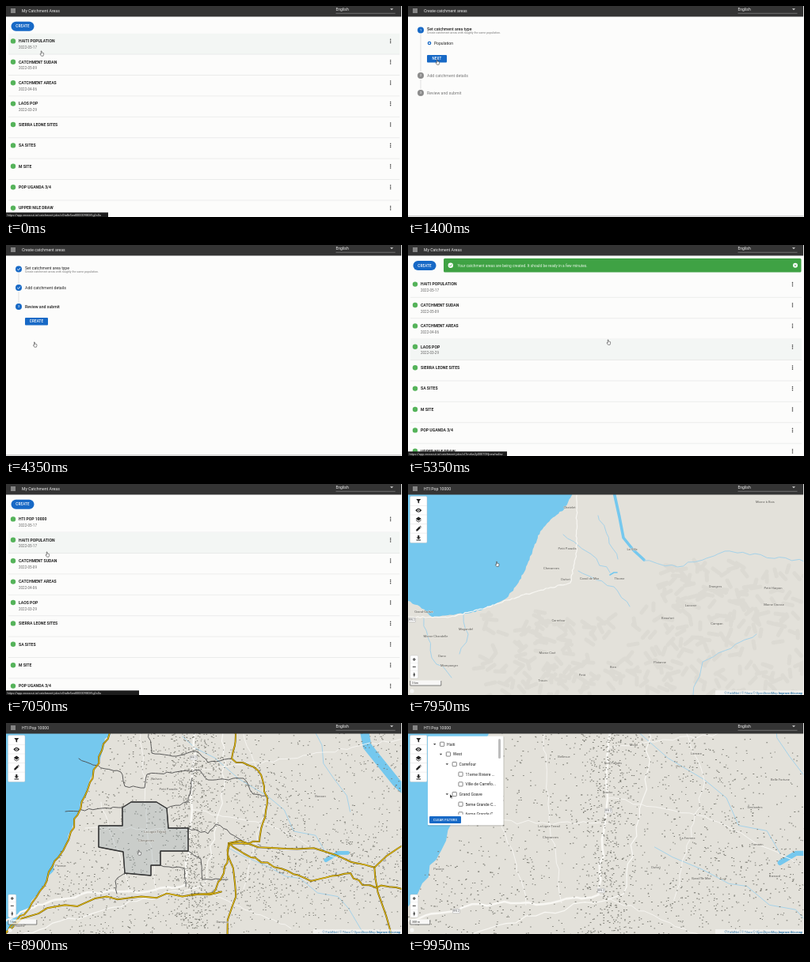
An HTML page that plays this animation: 500 by 267 pixels, repeating every 10000 ms.

```html
<!DOCTYPE html>
<html lang="en">
<head>
<meta charset="utf-8">
<title>Catchment areas</title>
<style>
html, body { margin: 0; width: 100%; height: 100%; overflow: hidden; background: #fcfcfb; }
svg { display: block; font-family: Roboto, "Open Sans", sans-serif; }
#stage { width: 100vw; height: 100vh; }
#map path { fill: none; vector-effect: non-scaling-stroke; stroke-linejoin: round; stroke-linecap: round; }
#map .fill { fill: #8fa0a6; fill-opacity: .3; }
#map .scaled { vector-effect: none; }
</style>
</head>
<body>
<svg id="stage" viewBox="0 0 500 267" preserveAspectRatio="none">
  <g id="map"></g>
  <g id="ui"></g>
</svg>
<script>
const LOOP = 10000, BLUE = '#1769c6', GREEN = '#55b35a', INK = '#222';
const map = document.getElementById('map'), ui = document.getElementById('ui');

// Drawing helpers; text is centred vertically on y
const text = (x, y, s, size = 5, fill = INK, attr = '') =>
  `<text x="${x}" y="${y + size * .36}" font-size="${size}" fill="${fill}" ${attr}>${s}</text>`;
const rect = (x, y, w, h, fill, attr = '') =>
  `<rect x="${x}" y="${y}" width="${w}" height="${h}" fill="${fill}" ${attr}/>`;
const circle = (x, y, r, fill) => `<circle cx="${x}" cy="${y}" r="${r}" fill="${fill}"/>`;
const line = (d, stroke, w = .6, attr = '') =>
  `<path d="${d}" fill="none" stroke="${stroke}" stroke-width="${w}" ${attr}/>`;
const shape = (d, fill) => `<path d="${d}" fill="${fill}"/>`;
const BOLD = 'font-weight="700"', MEDIUM = 'font-weight="500"', MIDDLE = 'text-anchor="middle"';
const button = (x, y, w, h, label, size = 4.5) =>
  rect(x, y, w, h, BLUE, `rx="${h > 10 ? h / 2 : 1}"`) +
  text(x + w / 2, y + h / 2, label, size, '#fff', `${MEDIUM} ${MIDDLE} letter-spacing=".18"`);

const clamp = v => Math.max(0, Math.min(1, v));
const ease = v => { v = clamp(v); return v * v * (3 - 2 * v); };
function track(keys, t) {
  let i = keys.findIndex(k => k[0] > t);
  if (i < 0) return keys[keys.length - 1].slice(1);
  if (!i) return keys[0].slice(1);
  const a = keys[i - 1], b = keys[i], p = ease((t - a[0]) / (b[0] - a[0]));
  return a.slice(1).map((v, j) => v + (b[j + 1] - v) * p);
}
function seeded(seed) {
  return () => (seed = (seed * 16807) % 2147483647) / 2147483647;
}

const pointer = [
  [0, 44, 57], [150, 43, 55], [500, 20, 26], [750, 20, 26], [1050, 30, 70], [1400, 36, 68],
  [1550, 36, 68], [1800, 62, 80], [2400, 62, 80], [2700, 62, 104], [2850, 62, 104],
  [3200, 35, 178], [3850, 35, 178], [4150, 35, 126], [4300, 35, 126], [4550, 38, 98],
  [4800, 38, 98], [5250, 252, 120], [5700, 252, 120], [6450, 489, 26], [6700, 489, 26],
  [7000, 51, 86], [7100, 51, 86], [7350, 40, 48], [7650, 40, 48], [8200, 165, 136],
  [8700, 165, 136], [8850, 167, 161], [9050, 167, 161], [9350, 14, 22], [9450, 14, 22],
  [9850, 53, 90]
];

function cursor(x, y, arrow) {
  const d = arrow
    ? 'M0 0V6.2L1.5 4.9 2.5 7.1 3.5 6.6 2.5 4.5H4.5Z'
    : 'M.3 0Q1-.6 1.3.2V2.6Q2 2 2.3 2.8 3 2.3 3.3 3 4.2 2.7 4.2 3.6V5.2L3.6 7.3H.6L-1.2 4.6Q-1.1 3.7.3 4.6Z';
  return `<path d="${d}" transform="translate(${x} ${y}) scale(.85)" fill="${arrow ? '#111' : '#fff'}"
    stroke="${arrow ? '#fff' : '#222'}" stroke-width=".6"/>`;
}

function header(title) {
  return rect(0, 0, 499.3, 13.5, '#343434') +
    [4, 6, 8].map(y => rect(6, y - .4, 6, .8, '#fff')).join('') +
    text(20, 6, title, 5.15, '#eee') + text(416.5, 4, 'English', 5, '#f4f4f4') +
    line('M416.5 9.3H491.5', '#aaa', .5) + shape('M485 3.2H489L487 5.3Z', '#ddd');
}

// Catchment list
const areas = ['HAITI POPULATION', 'CATCHMENT SUDAN', 'CATCHMENT AREAS', 'LAOS POP', 'SIERRA LEONE SITES',
  'SA SITES', 'M SITE', 'POP UGANDA 3/4', 'UPPER NILE DRAW'];
const dates = ['2022-05-17', '2022-05-09', '2022-04-06', '2022-03-29'];
const STEP = 26.4;

function list(t, x, y) {
  const banner = t > 4800 && t < 6700, added = t >= 6000;
  const names = added ? ['HTI POP 10000', ...areas] : areas;
  const days = added ? [dates[0], ...dates] : dates;
  const top = banner ? 39.9 : 34.7, hover = Math.floor((y - top) / STEP);
  let out = rect(0, 0, 500, 267, '#fcfcfb');
  names.forEach((name, i) => {
    const row = top + i * STEP, mid = row + 9.7;
    if (i === hover) out += rect(3, row, 494, STEP, '#f3f6f4');
    out += line(`M3 ${row + STEP}H497`, '#dfe1df', .6) + circle(9, mid, 3.2, GREEN) +
      text(16, mid, name, 5.1, INK, BOLD) + (days[i] ? text(16, mid + 8, days[i], 4.55, '#666') : '') +
      [-2.1, 0, 2.1].map(d => circle(485.5, mid + d, .75, '#333')).join('');
  });
  out += button(6.5, banner ? 20 : 19.7, 29, 12, 'CREATE');
  if (banner) out += rect(45, 17, 451.5, 17.5, '#3fa244', 'rx="1.5"') + circle(53.8, 25.8, 3.2, '#fff') +
    line('M52.2 25.8L53.4 27 55.5 24.6', '#3fa244', .8) +
    text(62.5, 25.8, 'Your catchment areas are being created. It should be ready in a few minutes.', 4.85, '#e9f6e9') +
    circle(489, 25.8, 3, '#fff') + line('M487.8 24.6L490.2 27M490.2 24.6L487.8 27', '#3fa244', .7);
  if (hover >= 0) {
    const id = hover === 3 ? 'cl7mr6w2y000709ljnewha4nv' : 'c0ta8e5wd000009l83f5g2s0u';
    out += rect(0, 261.3, t > 6700 ? 168 : banner ? 125 : 129, 5.7, '#1c1c1c') +
      text(1.5, 264.2, 'https://app.crosscut.io/catchment-jobs/' + id, 3.8, '#eee');
  }
  return out + header('My Catchment Areas');
}

// Creation form
const countries = ['Benin', 'Burundi', 'Djibouti', 'Dominican Republic', 'Equatorial Guinea', 'Eritrea', 'Eswatini',
  'Ethiopia', 'Gabon', 'Ghana', 'Guinea', 'Haiti', 'Honduras', 'Kenya', 'Lesotho'];

function step(n, y, label, active) {
  const done = n < active;
  return circle(16, y, 4, n <= active ? BLUE : '#8c8c8c') +
    (done ? line(`M14.2 ${y}L15.6 ${y + 1.4} 18 ${y - 1.4}`, '#fff', .9) : text(16, y, n, 4, '#fff', MIDDLE)) +
    text(24, n === 1 ? y - 1.8 : y, label, 5.2, n <= active ? INK : '#777', n === active ? MEDIUM : '');
}

function dropdown(t, y) {
  const scroll = ease((t - 3450) / 350) * 7, hover = Math.floor((y - 102.8) / 15.4);
  let items = '';
  countries.forEach((name, i) => items += text(5.3, 10.6 + (i - scroll) * 15.4, name, 5.05));
  return rect(23.5, 102, 464, 99, '#000', 'opacity=".09" rx="2"') + rect(24, 101, 463, 98, '#000', 'opacity=".14" rx="1"') +
    rect(24, 100, 463, 98, '#fff', 'rx="1"') +
    (hover >= 0 && hover < 6 ? rect(24, 102.8 + hover * 15.4 + .6, 459, 15.4, '#f2f5f3') : '') +
    `<svg x="24" y="100" width="459" height="98">${items}</svg>` + rect(482.5, 100, 4.5, 98, '#f5f5f5') +
    rect(483.2, 102 + scroll * 5, 2.8, 28, '#bdbdbd', 'rx="1.4"');
}

function form(t, y) {
  const active = t < 1550 ? 1 : t < 4300 ? 2 : 3;
  const ys = [[30.5, 88, 110], [30.5, 54, 151], [30.5, 54, 78]][active - 1];
  let out = rect(0, 0, 500, 267, '#fcfcfb') +
    line(`M16 ${ys[0] + 5}V${ys[1] - 5}M16 ${ys[1] + 5}V${ys[2] - 5}`, '#c4c4c4', .5) +
    step(1, ys[0], 'Set catchment area type', active) +
    text(24, 33.6, 'Create catchment areas with roughly the same population.', 3.6, '#777') +
    step(2, ys[1], 'Add catchment details', active) + step(3, ys[2], 'Review and submit', active);
  if (active === 1) out += circle(27, 47, 2.3, BLUE) + circle(27, 47, 1, '#fff') + text(33, 47, 'Population') +
    button(24, 62, 25, 9.5, 'NEXT');
  if (active === 2) {
    const typed = 'HTI Pop 10000'.slice(0, t < 2400 ? Math.round(clamp((t - 2020) / 220) * 7)
      : 7 + Math.round(clamp((t - 2400) / 200) * 6));
    const open = t > 2850 && t < 3950;
    out += text(24, 69, 'What do you want to call this set of catchment areas?', 3.65, '#777') +
      text(24, 75.6, typed) + line('M24 80.4H487', t < 2700 ? BLUE : '#888', .5) +
      text(24, 99, 'Select the country you want to target.', 3.6, open ? BLUE : '#777') +
      (t > 3950 ? text(24, 106, 'Haiti') : '') + line('M24 111H487', '#888', .5) +
      button(24, 121, 25, 9.5, 'NEXT');
    if (open) out += dropdown(t, y);
  }
  if (active === 3) out += button(24, 92, 29, 9.5, 'CREATE');
  return out + rect(0, 265.6, 500, .7, '#999') + header('Create catchment areas');
}

// Map: the wide view has scale 1, detail is drawn in the coordinates of the closer view
const views = [[1, 0, 0], [3.07, -379, -179.5], [3.96, -540, -278.6]];
function viewAt(scale) {
  const [a, b] = scale < 3.07 ? views : views.slice(1), p = (scale - a[0]) / (b[0] - a[0]);
  return a.map((v, i) => v + (b[i] - v) * p);
}

function ragged(points, amount, seed = 7) {
  const rnd = seeded(seed * 991), p = points.split(' ').map(s => s.split(',').map(Number));
  return 'M' + p.map((a, i) => {
    if (!i) return a.join(' ');
    const b = p[i - 1], n = Math.max(1, Math.round(Math.hypot(a[0] - b[0], a[1] - b[1]) / (amount * 4)));
    return Array.from({ length: n }, (_, k) => a.map((v, j) =>
      (b[j] + (v - b[j]) * (k + 1) / n + (k < n - 1 ? (rnd() - .5) * amount * 2 : 0)).toFixed(1)).join(' ')).join('L');
  }).join('L');
}
const border = (d, wide = 2) => line(d, '#66530a', wide) + line(d, '#e6bd12', wide * .55);

function buildMap() {
  const rnd = seeded(4219);
  let hills = '', dots = '';
  for (let i = 0; i < 420; i++) {
    const x = 90 + rnd() * 430, y = 95 + rnd() * 180, a = rnd() * 3;
    if (y < 160 && x < 300) continue;
    hills += `M${x.toFixed(0)} ${y.toFixed(0)}l${(Math.cos(a) * 12).toFixed(1)} ${(Math.sin(a) * 9).toFixed(1)}`;
  }
  const towns = Array.from({ length: 34 }, () => [rnd() * 520, rnd() * 270]);
  for (let i = 0; i < 3400; i++) {
    const c = towns[i % 34], spread = (rnd() + rnd() + rnd() - 1.5) * 70;
    let x = i % 5 === 0 ? 235 + spread * .4 : i % 3 ? c[0] + spread : rnd() * 540;
    let y = i % 5 === 0 ? rnd() * 260 : i % 3 ? c[1] + (rnd() + rnd() - 1) * 48 : rnd() * 270;
    if (x > 140 - (y - 14) * .5) dots += `M${x.toFixed(1)} ${y.toFixed(1)}h${(.2 + rnd() * .7).toFixed(1)}`;
  }
  const coast = '212,0 207,14 197,32 180,45 167,60 157,86 147,111 133,135 122,146 110,152';
  const outer = [
    '110,152 130,139 165,130 196,130 212,128', '215,108 218,130 213,150 222,170 225,190 230,210 270,205 300,205 310,190 335,200 350,205 440,207 443,190 430,160 420,100',
    '180,45 213,44 235,35 255,50 275,48 300,45 318,55 330,75 340,85 345,98', '300,14 310,45', '382,14 375,40 383,60 380,95',
    '345,98 380,95 420,90 460,95 500,85', '215,108 250,110 275,118 305,98 345,98', '305,110 312,160 335,175 345,190',
    '345,110 350,150 372,153 385,175 400,160 390,125 415,100', '275,118 285,160 300,172 310,190',
    '190,207 185,240 205,245 245,235 270,267', '225,210 250,238', '300,206 330,230 375,240 400,267', '150,212 165,235 185,240 160,267'
  ];
  const roads = ['235,-160 238,14 235,110 230,160 226,205 180,213 110,214 40,230 0,250', '226,205 280,225 360,260',
    '100,133 235,135', '235,60 360,45 500,20', '235,110 330,128 420,175', '120,100 150,190 155,215', '170,14 175,100 190,213', '300,14 330,95 300,210'];
  const inner = ['92,45 125,58 145,62 150,80 175,82 178,65 245,60 255,72 300,70 312,90 330,92', '180,14 184,38 215,42 240,36 255,50 285,45',
    '75,112 120,108 147,107', '230,133 255,140 265,128 300,150', '230,162 246,172 248,198 280,198', '150,190 138,200 140,216', '195,180 225,184 227,207',
    '203,108 230,100 235,70', '183,-25 188,14', '150,-55 180,-50 184,-20 230,-25 255,0 285,10'];
  const region = '112,150 130,139 165,130 196,130 193,150 190,175 188,195 190,207 165,207 155,212 135,200 118,200 108,185 120,174 105,165 112,150';
  const block = 'M147 107L158 100H190L203 108 205 133H230V162H195V180H183V193L150 190 148 163 117 157V130H147Z';
  const near = s => `<g transform="scale(${1 / 3.07}) translate(379 179.5)">${s}</g>`;
  map.innerHTML = rect(-100, -100, 800, 500, '#e3e1da') +
    line(hills, '#aaa99f', 5, 'class="scaled" opacity=".13"') +
    `<path d="${ragged(coast + ' 85,162 60,165 30,168 15,155 0,148', .8)}L-60 140V-20H212Z" style="fill:#75c8ee"/>` +
    line('M260 10L267 42 272 68 284 83 298 96', '#75c8ee', 3.6, 'class="scaled"') +
    line(ragged('255,115 260,112 264,112', 1), '#75c8ee', 1.6, 'class="scaled"') +
    [ '298,97 340,105 400,85 500,98', '196,64 225,85 255,112', '70,165 76,190 65,215', '240,40 265,95', '215,110 260,130 280,155', '20,170 30,220 55,245', '360,267 372,225 440,190'].map((p, i) =>
      line(ragged(p, 2, i + 3), '#a5d2e9', 1)).join('') +
    line(ragged('0,168 50,169 95,158 125,147 165,135 205,125 213,85 213,14', .8), '#f8f7f3', 1.2) +
    near(`<g id="detail">${roads.map((p, i) => line(ragged(p, 2, i + 2), '#f8f7f3', i ? .9 : 2.6)).join('')}
      ${line(dots, '#77776f', 1)}</g>`) +
    `<g id="areas">${near(inner.map((p, i) => line(ragged(p, 1.3, i + 5), '#4b4b4b', .9)).join('') + line(block, '#4b4b4b', .9))}
      ${border(ragged(coast, .7))}${outer.map((p, i) => border(ragged(p, 1.4, i + 11))).join('')}
      ${near(border(ragged('283,153 320,150 330,95 318,60 285,45 290,14 276,-30 230,-110 180,-118', 2)) +
        border(ragged('283,153 275,190 262,215 235,218', 2)) + border(ragged('283,153 300,165 385,200 435,190 450,205 500,210', 2)))}</g>
      <g id="wideHover"><path class="fill" d="${ragged(region, 1.2)}" stroke="#66600f" stroke-width="1.2"/></g>
      <g id="closeHover">${near(`<path class="fill" d="${block}" stroke="#333" stroke-width="1.4"/>`)}</g>`;
}
buildMap();
const layer = id => document.getElementById(id).style;

const places = [
  [['Chatelet', 204, 30], ['Petit Paradis', 201, 82], ['Chevannes', 181, 107], ['Dufort', 199, 121], ['Corail de Mar', 229, 120],
    ['Grand-Goâve', 20, 162], ['Magandel', 73, 184], ['Morne Chandelle', 35, 193], ['Dano', 43, 218], ['Mompanger', 52, 230],
    ['Carrefour', 190, 173], ['Morne Ciné', 176, 214], ['Bien', 259, 232], ['Thome', 267, 120], ['La Ville', 283, 83], ['Orangers', 388, 130],
    ['Lacorne', 357, 154], ['Beaufort', 328, 170], ['Campan', 390, 177], ['Platanne', 318, 226], ['Petit', 220, 242], ['Trouin', 170, 249],
    ['Morne à Bois', 451, 23], ['Petit Harpon', 461, 132], ['Morne Grosse', 462, 153]],
  [['Chevannes', 177, 149], ['La Ligne Terrail', 188, 138], ['Nolivos', 190, 71], ['Petit Paradis', 205, 84], ['Paverie', 69, 181],
    ['Dampus', 273, 252], ['Fauche', 17, 257], ['Bossan', 397, 93]],
  [['Bellevue', 197, 43], ['Port Paradis', 259, 51], ['Morel', 285, 28], ['Lamare', 364, 39], ['Belle Fortune', 470, 72],
    ['Deslandes', 438, 107], ['La Ferriere', 353, 146], ['Chevannes', 180, 145], ['La Ligne Terrail', 178, 131], ['Tamarin', 441, 154],
    ['Dufort', 313, 183], ['Corail de Mar', 370, 197], ['Barnard', 463, 194], ['Paverie', 39, 185], ['Brache', 252, 88]]
];
const shields = [[[5, 172]], [[237, 44]], [[253, 111], [244, 212], [61, 238]]];

function labels(level, [s, ox, oy]) {
  const [vs, vx, vy] = views[level];
  const at = (x, y) => [(x - vx) / vs * s + ox, (y - vy) / vs * s + oy];
  return places[level].map(([name, px, py]) => {
    const [x, y] = at(px, py);
    return text(x, y, name, 4.1, '#55544f', `${MIDDLE} stroke="#eceae4" stroke-width=".7" paint-order="stroke"`);
  }).join('') + shields[level].map(([px, py]) => {
    const [x, y] = at(px, py);
    return rect(x - 4.5, y - 2.7, 9, 5.4, '#fff', 'stroke="#888" stroke-width=".4" rx=".8"') + text(x, y, 'RN 2', 3.4, '#444', MIDDLE);
  }).join('');
}

function controls(level) {
  const icon = (y, d) => `<g transform="translate(13.3 ${y})">${d}</g>`;
  const bar = [39, 36, 25][level];
  return rect(2.5, 15.5, 21.5, 59, '#fff', 'rx="1.5" stroke="#bbb" stroke-width=".4"') +
    line('M3 27.4H24M3 39H24M3 50.6H24M3 62.2H24', '#ddd', .5) +
    icon(21.6, shape('M-3-2.6H3L.8.2V3L-.8 2.2V.2Z', INK)) +
    icon(33.2, shape('M-4 0Q0-5 4 0 0 5-4 0Z', INK) + circle(0, 0, 1.5, '#fff') + circle(0, 0, .8, INK)) +
    icon(44.8, shape('M0-3.3L3.5-.8 0 1.7-3.5-.8Z', INK) + line('M-3.3 1L0 3.3 3.3 1', INK, .8)) +
    icon(56.4, shape('M-3 3V1.3L1-2.7 2.7-1-1.3 3ZM1.5-3.2L2.2-3.6 3.6-2.2 3.1-1.6Z', INK)) +
    icon(68, shape('M-1-3H1V-.6H2.8L0 2-2.8-.6H-1ZM-2.8 2.6H2.8V3.5H-2.8Z', INK)) +
    rect(2.8, 217, 10, 29, '#fff', 'rx="1.4" stroke="#bbb" stroke-width=".4"') + line('M3 226.6H12.6M3 236.2H12.6', '#ddd', .4) +
    line('M5.8 222H9.8M7.8 220V224M5.8 231.4H9.8', '#222', .9) + shape('M7.8 238L9 241.2 7.8 244.4 6.6 241.2Z', '#555') +
    rect(2.8, 248.5, bar, 6.5, '#fff', 'opacity=".75"') + line(`M2.8 249V255H${2.8 + bar}V249`, '#333', .6) +
    text(5, 251.8, ['3 km', '1 km', '300 m'][level], 3.6, '#333') + circle(5, 262, 2.6, '#f4f4f4') +
    rect(388, 261.2, 112, 5.8, '#fff', 'opacity=".55"') +
    text(498, 264.2, '© FieldNet | © Tilora © OpenStreetMap <tspan font-weight="700">Improve this map</tspan>', 3.9, '#2b75a8', 'text-anchor="end"');
}

const tree = [['Haiti', 0], ['West', 1], ['Carrefour', 2], ['11eme Riviere ...', 3], ['Ville de Carrefo...', 3],
  ['Grand Goave', 2], ['5eme Grande C...', 3], ['6eme Grande C...', 3]];
function filterPanel(t) {
  const count = t < 9550 ? 1 : t < 9650 ? 2 : t < 9800 ? 6 : 8;
  const rows = tree.slice(0, count).map(([name, depth], i) => {
    const x = depth * 7.8, y = 10 + i * 12.65;
    return (depth < 3 ? shape(`M${x + 7} ${y - .8}h3.4l-1.7 2z`, '#444') : '') +
      rect(x + 15.5, y - 2.6, 5.2, 5.2, '#fff', 'rx=".6" stroke="#555" stroke-width=".7"') + text(x + 24, y, name, 5.1);
  }).join('');
  return rect(25, 17.5, 96.5, 113, '#000', 'opacity=".15"') + rect(25, 16.8, 95.5, 112.4, '#fff', 'rx="1"') +
    `<svg x="25" y="16.8" width="88" height="99">${rows}</svg>` + rect(114, 20, 3, 25, '#bdbdbd', 'rx="1.5"') +
    button(27, 118, 40, 9, 'CLEAR FILTERS', 4);
}

function mapScreen(t) {
  const scale = Math.exp(track([[8500, 0], [8820, Math.log(3.07)], [9050, Math.log(3.07)], [9300, Math.log(3.96)]], t)[0]);
  const view = viewAt(scale), level = scale < 1.9 ? 0 : scale < 3.5 ? 1 : 2;
  map.setAttribute('transform', `translate(${view[1]} ${view[2]}) scale(${scale})`);
  layer('detail').opacity = clamp((scale - 1.5) / 1.2);
  layer('areas').display = t > 8050 && t < 9600 ? '' : 'none';
  layer('wideHover').display = t > 8200 && level === 0 ? '' : 'none';
  layer('closeHover').display = level === 1 ? '' : 'none';
  return (t < 7900 ? rect(0, 0, 500, 267, '#e3e1da') : labels(level, view)) + controls(level) +
    (t > 9450 ? filterPanel(t) : '') + header('HTI Pop 10000');
}

function render(t) {
  const [x, y] = track(pointer, t), onMap = t >= 7700;
  map.style.display = onMap ? '' : 'none';
  const screen = onMap ? mapScreen(t) : t >= 700 && t < 4800 ? form(t, y) : list(t, x, y);
  ui.innerHTML = screen + rect(499.3, 0, .7, 267, '#f4f4f4') + cursor(x, y, t > 9350);
}

const start = performance.now();
function frame() {
  render((performance.now() - start) % LOOP);
  requestAnimationFrame(frame);
}
frame();
</script>
</body>
</html>
```
